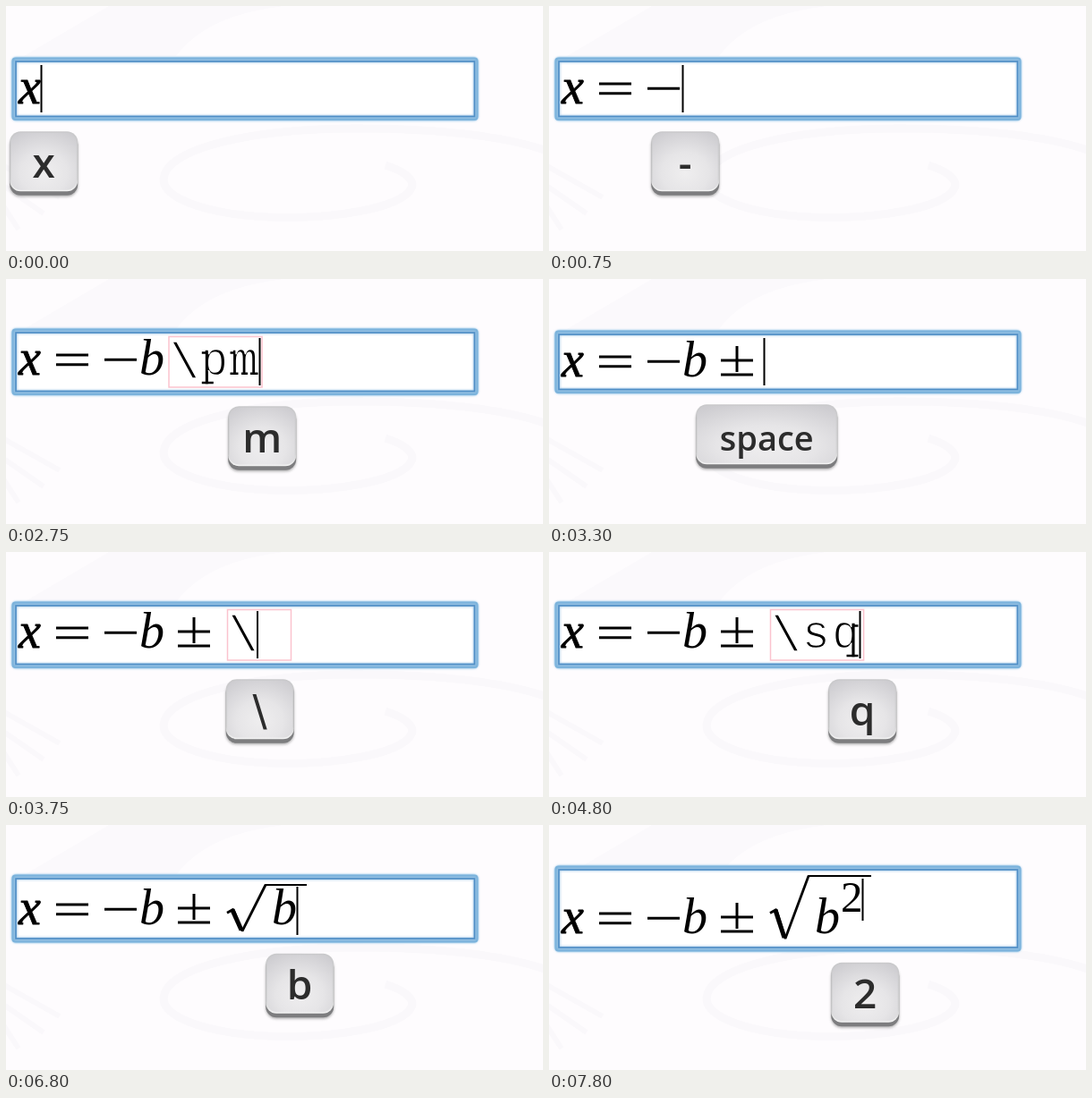
Write an HTML page that moves like this. It is 600 px wide and 274 px high and loops after 8 s.

```html
<!DOCTYPE html>
<html lang="en">
<head>
<meta charset="utf-8">
<title>Typing a formula</title>
<style>
  html, body { margin: 0; width: 100%; height: 100%; overflow: hidden; background: #fefcfe; }
  svg { display: block; width: 100vw; height: 100vh; }
  .math { font: italic 56px "Liberation Serif", serif; }
  .bold { stroke: #000; stroke-width: .8; }
  .sup { font: 49px "Liberation Serif", serif; }
  /* the white outline thins the strokes */
  .code { font: 51px "Liberation Mono", monospace; text-anchor: middle; stroke: #fff; stroke-width: 1.4; }
  .code.slash { font-size: 56px; }
  .label { font: 600 46px "Open Sans", sans-serif; text-anchor: middle; fill: #2c2c2c; }
  .label.slash { font: 48px "DejaVu Sans", sans-serif; }
  .label.word { font-size: 38px; }
  .op { fill: none; stroke: #000; stroke-width: 3; }
  .slab { fill: none; stroke: #000; stroke-width: 2.6; }
  .swirl { fill: none; stroke: #faf8fb; }
</style>
</head>
<body>
<svg viewBox="0 0 600 274" preserveAspectRatio="none">
  <defs>
    <radialGradient id="cap" cy=".7" r=".8">
      <stop offset="0" stop-color="#efeeef"/>
      <stop offset=".45" stop-color="#e6e5e7"/>
      <stop offset="1" stop-color="#cdccd0"/>
    </radialGradient>
    <linearGradient id="rim" x2="0" y2="1">
      <stop offset="0" stop-color="#c9c9cb"/>
      <stop offset=".8" stop-color="#d2d2d3"/>
      <stop offset="1" stop-color="#f4f4f4"/>
    </linearGradient>
    <filter id="soft" x="-20%" y="-20%" width="140%" height="140%"><feGaussianBlur stdDeviation="1.6"/></filter>
    <filter id="glow" x="-5%" y="-20%" width="110%" height="140%"><feGaussianBlur stdDeviation=".9"/></filter>
  </defs>

  <rect width="600" height="274" fill="#fefcfe"/>
  <path fill="#fbf9fc" d="M20 56L115 0H310C250 8 215 24 190 56Z"/>
  <g class="swirl">
    <path stroke-width="9" d="M424 178C480 196 452 222 380 232C280 246 178 226 176 195C176 160 270 138 385 137C480 136 560 146 604 162"/>
    <path stroke-width="6" d="M-4 178L60 214M-4 200L42 232M-4 222L14 250"/>
  </g>

  <g id="field">
    <rect class="box" fill="none" stroke="#8fc2e6" stroke-width="5" rx="3" filter="url(#glow)"/>
    <rect class="box" fill="#fff" stroke="#7ab2db" stroke-width="4" rx="2"/>
    <rect class="inner" fill="none" stroke="#a9cdea" stroke-width="3" filter="url(#glow)"/>
    <rect class="inner" fill="none" stroke="#4f8ec6" stroke-width="1.7"/>
  </g>

  <g id="line">
    <text class="math bold" x="14">x</text>
    <path class="op" d="M56 -22H92M56 -11.2H92"/>
    <path class="op" d="M110 -16.7H146"/>
    <text class="math" x="149">b</text>
    <path class="op" d="M192 -18H228M210 -34V-5M192 -2H228"/>
  </g>
  <g id="root">
    <path id="tick" fill="none" stroke="#000" stroke-linejoin="bevel" stroke-width="2.8"/>
    <path id="thick" fill="none" stroke="#000" stroke-width="5"/>
    <path id="bar" stroke="#000" stroke-width="2"/>
  </g>
  <text id="rootB" class="math" x="297">b</text>
  <text id="sup" class="sup" x="326" y="97">2</text>

  <g id="command">
    <rect id="pink" y="64.5" height="56.5" fill="none" stroke="#fbc3ce" stroke-width="1.5"/>
    <g id="letters"></g>
  </g>
  <rect id="caret" width="2" fill="#000"/>

  <g id="key">
    <rect class="cap" y="4" height="69" rx="12" fill="#777" opacity=".6" filter="url(#soft)"/>
    <rect class="cap" y="3" height="68.5" rx="12" fill="#7d7d7f"/>
    <rect class="cap" y="0" height="67" rx="12" fill="url(#rim)"/>
    <rect id="face" y="1.5" height="64" rx="11" fill="url(#cap)"/>
    <text id="label" y="51.5"></text>
  </g>
</svg>
<script>
const LOOP = 8000, CELL = 33.2;
const $ = id => document.getElementById(id);
const set = (el, attrs) => { for (const k in attrs) el.setAttribute(k, attrs[k]); };
const setAll = (sel, attrs) => document.querySelectorAll(sel).forEach(el => set(el, attrs));
const show = (el, on) => el.style.display = on ? "" : "none";

// Vertical metrics: field edges, baseline, caret span
const layouts = {
  plain:   { top: 57, bottom: 128.5, base: 109, caret: [66, 119] },
  command: { top: 55, bottom: 130.5, base: 107, caret: [66, 119] },
  root:    { top: 55, bottom: 132, base: 111, caret: [69, 123] },
  power:   { top: 45, bottom: 142, base: 121, caret: [60, 107] }
};

// time, key, layout, caret x, symbols shown, command, command x / bar end
const steps = [
  [0,    "x", "plain", 39, 1],
  [250,  "=", "plain", 104, 2],
  [750,  "-", "plain", 149, 3],
  [1250, "b", "plain", 176, 4],
  [1750, "\\", "command", 215, 4, "\\", 182],
  [2250, "p", "command", 248, 4, "\\p", 182],
  [2750, "m", "command", 283, 4, "\\pm", 182],
  [3250, "space", "plain", 240, 5],
  [3750, "\\", "command", 280.5, 5, "\\", 247.5],
  [4250, "s", "command", 314, 5, "\\s", 247.5],
  [4750, "q", "command", 347, 5, "\\sq", 247.5],
  [5300, "r", "command", 381, 5, "\\sqr", 247.5],
  [5750, "t", "command", 414, 5, "\\sqrt", 247.5],
  [6250, "space", "root", 297, 5, "", 308],
  [6750, "b", "root", 325, 5, "", 336],
  [7300, "^", "power", 327, 5, "", 338],
  [7800, "2", "power", 350, 5, "", 360]
];

// Slab serifs around each cell's centre
const slabs = {
  p: "M-14 -24.5H-8M-14 9H-1",
  m: "M-15.5 -24.5H-10M-15.5 -1.3H-6.5M-3 -1.3H4M7 -1.3H15.5",
  q: "M8 -24.5H14M1 9H14",
  r: "M-12 -24.5H-5M-12 -1.3H6"
};

function make(tag, attrs) {
  const el = document.createElementNS("http://www.w3.org/2000/svg", tag);
  set(el, attrs);
  return el;
}

function drawCommand(text, x, base) {
  show($("command"), text);
  if (!text) return;
  set($("pink"), { x, width: Math.max(71, text.length * CELL + 4.5) });
  const box = $("letters");
  box.replaceChildren();
  [...text].forEach((ch, i) => {
    const slash = ch === "\\";
    const g = make("g", { transform: `translate(${x + (i + .5) * CELL + 1} ${base})` });
    const letter = make("text", { class: slash ? "code slash" : "code", y: slash ? 3 : 0 });
    letter.textContent = ch;
    g.append(letter);
    if (slabs[ch]) g.append(make("path", { d: slabs[ch], class: "slab" }));
    box.append(g);
  });
}

function drawRoot(end, tall) {
  const t = tall ? 57 : 67, b = tall ? 127 : 118.5, mid = t + (b - t) * .55;
  set($("tick"), { d: `M247 ${mid + 3}L254 ${mid - 1}L264 ${b}L290 ${t}` });
  set($("thick"), { d: `M253 ${mid}L263 ${b - 1}` });
  set($("bar"), { d: `M289 ${t}H${end}` });
}

function drawKey(text, cx, top) {
  const wide = text.length > 1, w = wide ? 158 : 76;
  set($("key"), { transform: `translate(${cx} ${top})` });
  setAll(".cap", { x: -w / 2, width: w });
  set($("face"), { x: 1.5 - w / 2, width: w - 3 });
  $("label").textContent = text;
  set($("label"), { class: wide ? "label word" : text === "\\" ? "label slash" : "label" });
}

function draw([, key, name, caret, count, command, x]) {
  const { top, bottom, base, caret: [c0, c1] } = layouts[name];
  setAll(".box", { x: 8.5, y: top + 2.5, width: 517, height: bottom - top - 5 });
  setAll(".inner", { x: 11, y: top + 5, width: 512.5, height: bottom - top - 10 });
  set($("line"), { transform: `translate(0 ${base})` });
  [...$("line").children].forEach((el, i) => show(el, i < count));
  drawCommand(command, x, base);
  const rooted = name === "root" || name === "power";
  show($("root"), rooted);
  if (rooted) drawRoot(x, name === "power");
  show($("rootB"), rooted && caret > 300);
  set($("rootB"), { y: base });
  show($("sup"), key === "2");
  set($("caret"), { x: caret - .5, y: c0, height: c1 - c0 });
  drawKey(key, caret + 3.2, bottom + 11.7);
}

let current;
function tick(now) {
  const t = now % LOOP;
  const step = steps.findLast(s => s[0] <= t) || steps[0];
  if (step !== current) draw(current = step);
  requestAnimationFrame(tick);
}
draw(current = steps[0]);
requestAnimationFrame(tick);
</script>
</body>
</html>
```
